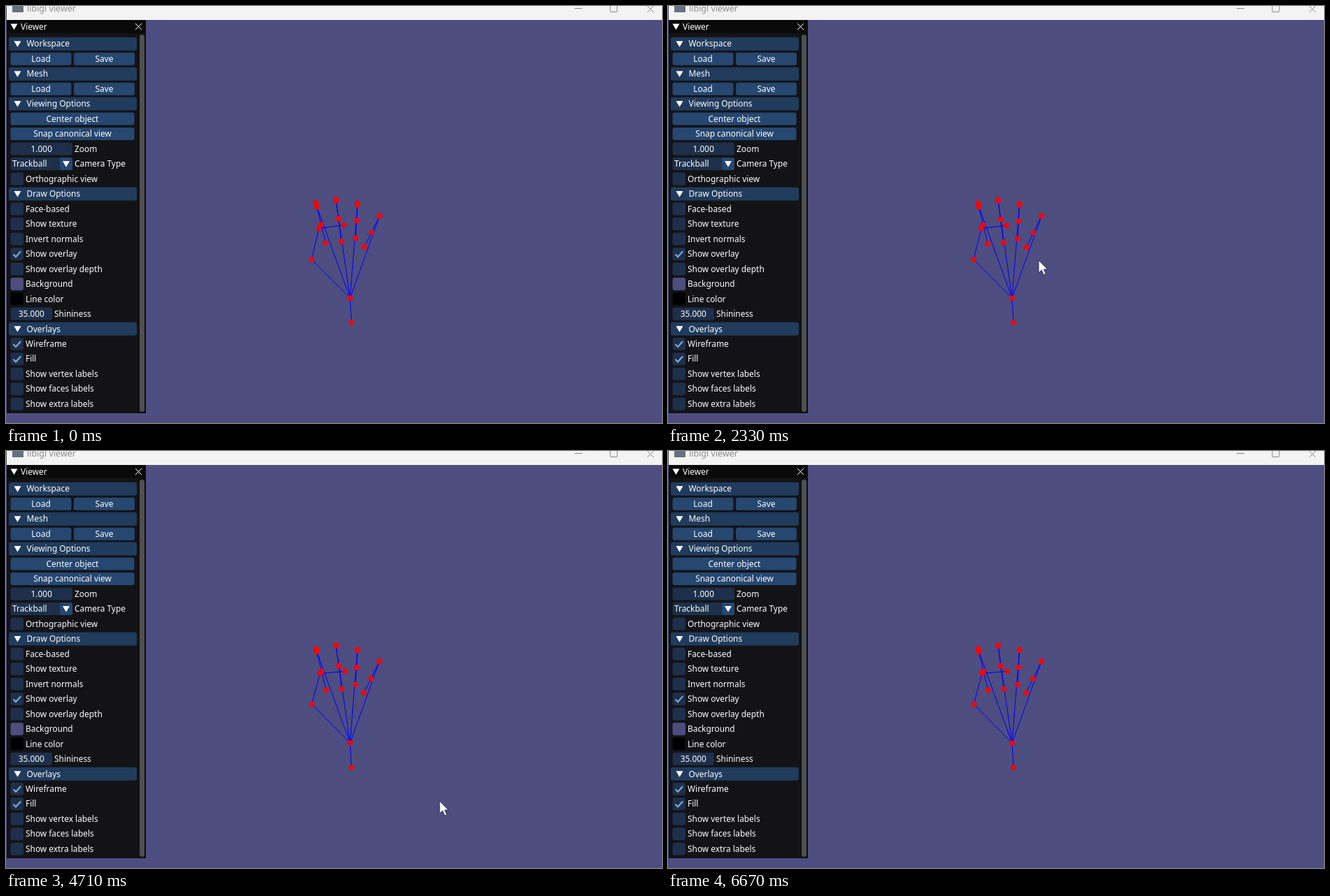
These frames come from a looping animation (938x597 px, 7.2 s). An HTML page:

```html
<!DOCTYPE html>
<html lang="en">
<head>
<meta charset="utf-8">
<title>Hand skeleton viewer</title>
<style>
html, body { margin: 0; width: 100%; height: 100%; overflow: hidden; background: #4d4d80; }
svg { display: block; }
text { font: 11.9px "Noto Sans", "Open Sans", sans-serif; fill: #fff; }
</style>
</head>
<body>
<svg id="stage" width="938" height="597" viewBox="0 0 938 597"></svg>
<script>
const NS = "http://www.w3.org/2000/svg";
const stage = document.getElementById("stage");
const HEADER = "#203b5c", BUTTON = "#254770", FRAME = "#1d2f4a", BACK = "#4d4d80";

function add(tag, attrs, content) {
  const el = document.createElementNS(NS, tag);
  for (const k in attrs) el.setAttribute(k, attrs[k]);
  if (content) el.textContent = content;
  stage.appendChild(el);
  return el;
}
const rect = (x, y, width, height, fill, rx = 0) => add("rect", { x, y, width, height, fill, rx });
const path = (d, stroke, w = 1) => add("path", { d, stroke, "stroke-width": w, fill: "none" });
const label = (x, y, s, anchor = "start") => add("text", { x, y: y + 4.2, "text-anchor": anchor }, s);
const triangle = (x, y) => add("path", { d: `M${x - 5} ${y - 4}h10l-5 8.5z`, fill: "#fff" });

// Window frame
rect(0, 0, 938, 597, BACK);
rect(0, 0, 938, 20, "#f3f3f3");
rect(0, 0, 1, 20, "#4a4a55");
rect(9, -6, 16, 15, "#66727f");
add("text", { x: 30, y: 8, style: "font-size:12.5px;fill:#8c8c8c" }, "libigl viewer");
path("M813 3.5h11M864 -2v9.5q0 1 1 1h8q1 0 1 -1V-2M917 0l9 9M926 0l-9 9", "#858585");

// Side panel
rect(1, 20, 199, 563, "#131316");
rect(1, 20, 199, 18.5, "#0a0a0a");
rect(190, 39, 10, 544, "#0c0c0e");
rect(191, 41, 7, 540, "#4f4f4f", 3);
triangle(11.5, 29.5);
label(21, 29.7, "Viewer");
path("M185 25l9 9M194 25l-9 9", "#fff", 1);

const button = (x, y, w, s) => {
  rect(x, y - 9, w, 18, BUTTON, 3);
  label(x + w / 2, y, s, "middle");
};
const widgets = {
  head(y, s) {
    rect(4, y - 9.5, 183, 19, HEADER, 3);
    triangle(16.5, y);
    label(29.5, y, s);
  },
  pair(y) {
    button(6.5, y, 87, "Load");
    button(97, y, 87, "Save");
  },
  wide(y, s) { button(6.5, y, 177, s); },
  value(y, s, v, w) {
    rect(6.5, y - 9, w, 18, FRAME, 3);
    label(6.5 + w / 2, y, v, "middle");
    label(9.5 + w, y, s);
  },
  combo(y, s, v) {
    rect(6.5, y - 9, 88.5, 18, FRAME, 3);
    rect(77, y - 9, 18, 18, BUTTON, 3);
    triangle(86, y);
    label(9, y, v);
    label(98, y, s);
  },
  color(y, s, fill) {
    rect(6.5, y - 9, 18.5, 18, fill, 3);
    label(28, y, s);
  },
  check(y, s, on) {
    widgets.color(y, s, FRAME);
    if (on) path(`M10.5 ${y + .5}l3.6 3.7l7 -8`, "#83a9d6", 2.2);
  }
};
[
  ["head", "Workspace"], ["pair"], ["head", "Mesh"], ["pair"],
  ["head", "Viewing Options"], ["wide", "Center object"], ["wide", "Snap canonical view"],
  ["value", "Zoom", "1.000", 88.5], ["combo", "Camera Type", "Trackball"],
  ["check", "Orthographic view"],
  ["head", "Draw Options"], ["check", "Face-based"], ["check", "Show texture"],
  ["check", "Invert normals"], ["check", "Show overlay", true], ["check", "Show overlay depth"],
  ["color", "Background", BACK], ["color", "Line color", "#000"],
  ["value", "Shininess", "35.000", 59.5],
  ["head", "Overlays"], ["check", "Wireframe", true], ["check", "Fill", true],
  ["check", "Show vertex labels"], ["check", "Show faces labels"], ["check", "Show extra labels"]
].forEach(([kind, ...args], i) => widgets[kind](54.2 + 21.48 * i, ...args));

// Hand: angles in degrees, headings measured clockwise from straight up
const WRIST = [492, 418], ARM = [494, 453];
const rad = a => a * Math.PI / 180;
const step = ([x, y], heading, len) => [x + len * Math.sin(rad(heading)), y - len * Math.cos(rad(heading))];

// The thumb swings within the picture plane
const THUMB = [
  { len: 78, start: -55.4, rate: .48 },
  { len: 45.5, start: -35.5, rate: 2.25 },
  { len: 36, start: -9.5, rate: 4.2 }
];
function thumb(q) {
  let p = WRIST;
  return THUMB.map(b => p = step(p, b.start + b.rate * q, b.len));
}

// Fingers curl towards the viewer, so each bone shortens by the cosine of its bend
const BEND_RATE = [3.05, 5.4, 5.6];
const FINGERS = [
  { knuckle: [444.5, 287.5], heading: -13.5, lens: [35, 37, 28], bend: [14, 32, 45] },
  { knuckle: [472, 279], heading: -7.5, lens: [36, 35, 34], bend: [20, 26, 45] },
  { knuckle: [502.5, 285], heading: 3, lens: [38, 29, 25], bend: [20, 31, 60] },
  { knuckle: [534, 301], heading: 26, lens: [27, 30, 23], bend: [22, 34, 60] }
];
function finger({ knuckle, heading, lens, bend }, q) {
  let p = knuckle;
  return [p, ...lens.map((len, i) => p = step(p, heading, len * Math.cos(rad(bend[i] + BEND_RATE[i] * q))))];
}
const handAt = q => [thumb(q), ...FINGERS.map(f => finger(f, q))];

// Each cycle closes the hand steadily, rests in a fist, then snaps open
const OPEN = -5, FIST = 22.5, CYCLE = 29.75;
const flexAt = tick => Math.min(FIST, OPEN + (tick - 3 + CYCLE) % CYCLE);

// Mouse track: tick, x, y
const MOUSE = [[4, 677, 481], [8, 541, 345], [14, 508, 295], [20, 546, 332], [30, 530, 364], [38, 604, 450],
  [42, 614, 409], [58, 628, 446], [61, 620, 501], [72, 748, 488], [78, 700, 422], [89, 876, 596]];
function mouseAt(tick) {
  const i = Math.max(1, MOUSE.findIndex(m => m[0] >= tick));
  const [a, ax, ay] = MOUSE[i - 1], [b, bx, by] = MOUSE[i];
  const u = (tick - a) / (b - a);
  return [ax + (bx - ax) * u, ay + (by - ay) * u];
}

// Steady runs of ticks with rests between: first time, last time, first tick, last tick
const RUNS = [[0, 530, 0, 8], [930, 2330, 9, 30], [2400, 4240, 31, 58], [4570, 6670, 59, 90]];
const LOOP = 7200;
function tickAt(t) {
  const [a, b, m, n] = RUNS.filter(r => t >= r[0]).pop();
  return Math.min(n, Math.floor(m + (n - m) * (t - a) / (b - a) + .1));
}

const bones = path("", "#0000ff");
const dots = [ARM, WRIST, ...handAt(0).flat()].map(() => add("circle", { r: 3.8, fill: "#ff0000" }));
const cursor = add("path", {
  d: "M0 0V18L4.2 14.1L7.4 21L10.3 19.8L7.4 13H12.6Z",
  fill: "#fff", stroke: "#26264a", "stroke-width": .9
});

function draw(t) {
  const tick = tickAt(t), pose = handAt(flexAt(tick));
  bones.setAttribute("d", `M${ARM}L${WRIST}` + pose.map(f => `M${WRIST}L${f.join("L")}`).join(""));
  [ARM, WRIST, ...pose.flat()].forEach(([x, y], i) => {
    dots[i].setAttribute("cx", x);
    dots[i].setAttribute("cy", y);
  });
  const shown = tick >= MOUSE[0][0] && tick <= MOUSE[MOUSE.length - 1][0];
  cursor.setAttribute("visibility", shown ? "visible" : "hidden");
  if (shown) cursor.setAttribute("transform", `translate(${mouseAt(tick)})`);
}

const begin = performance.now();
function loop() {
  draw((performance.now() - begin) % LOOP);
  requestAnimationFrame(loop);
}
draw(0);
requestAnimationFrame(loop);
</script>
</body>
</html>
```
